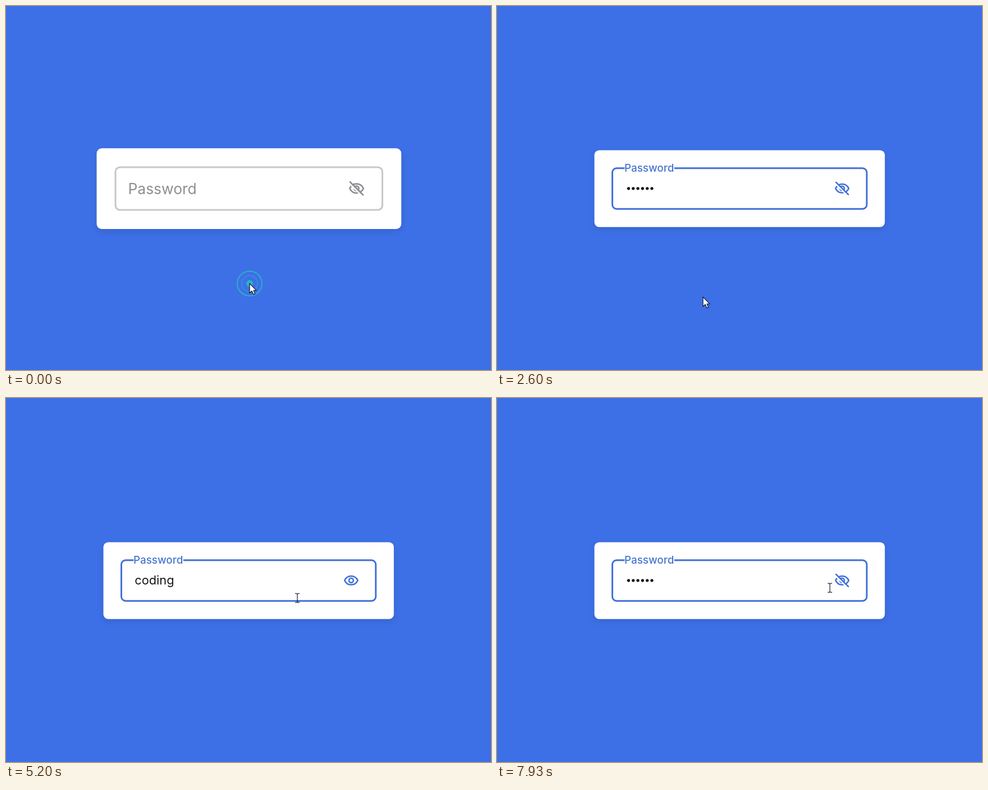
Write an HTML page with a canvas that moves like this. It is 864x648 px and loops after 8 s.

```html
<!DOCTYPE html>
<html lang="en">
<head>
<meta charset="utf-8">
<title>Password field</title>
<style>
html, body { margin: 0; width: 100%; height: 100%; overflow: hidden; background: #3d70e6; }
canvas { display: block; width: 864px; height: 648px; }
</style>
</head>
<body>
<canvas id="stage" width="864" height="648"></canvas>
<script>
const ctx = document.getElementById('stage').getContext('2d');
const LOOP = 8000;
const FONT = 'Inter, "Open Sans", sans-serif';
const GREY = [200, 200, 200], TEXT_GREY = [142, 143, 147], BLUE = [64, 112, 218];
const TEAL = '38, 198, 190';
const FOCUS_AT = 670;
const KEY_TIMES = [1400, 1530, 1670, 1800, 1930, 2070];
const CARET_ON = [[670, 1230], [1400, 2600], [3130, 3670]];
const SHOW_TEXT = [3920, 6680];

// time, x, y, 1 = straight speed towards this point
const PATH = [
  [0, 434, 494], [60, 434, 494], [470, 370.5, 350], [730, 370.5, 350],
  [1140, 342.5, 518], [1200, 342.5, 518], [1400, 367, 518], [2990, 367, 518],
  [3400, 605, 328], [3930, 605, 328], [4500, 259, 326], [5000, 400, 345, 1],
  [5200, 517, 356, 1], [5270, 657, 360, 1], [5330, 657.5, 338, 1],
  [5700, 273, 328], [6060, 606, 328], [6260, 606, 328], [6330, 611, 329],
  [6660, 611, 329], [7220, 256, 331], [7340, 256, 328], [7950, 594, 338], [8000, 594, 338]
];
const CLICKS = [[-230, 434, 494], [665, 368, 349], [3670, 605, 328], [6530, 612, 329]];

const clamp = v => Math.max(0, Math.min(1, v));
const lerp = (a, b, p) => a + (b - a) * p;
const smooth = p => { p = clamp(p); return p * p * (3 - 2 * p); };
const mix = (a, b, p) => `rgb(${a.map((v, i) => Math.round(lerp(v, b[i], p))).join(',')})`;
const within = (t, [from, to]) => t >= from && t < to;

function roundRect(x, y, w, h, r) {
  ctx.beginPath();
  ctx.roundRect(x, y, w, h, r);
}

function circle(x, y, r) {
  ctx.beginPath();
  ctx.arc(x, y, Math.max(0, r), 0, Math.PI * 2);
}

function line(x1, y1, x2, y2) {
  ctx.beginPath();
  ctx.moveTo(x1, y1);
  ctx.lineTo(x2, y2);
  ctx.stroke();
}

function focusProgress(t) {
  if (t < FOCUS_AT) return 0;
  const u = clamp((t - FOCUS_AT + 30) / 200);
  return 1 - Math.pow(1 - u, 2.2) * (1 + 0.85 * u);
}

function drawEye(color, crossed) {
  ctx.save();
  ctx.translate(624.5, 324.7);
  ctx.scale(1.36, 1.36);
  ctx.translate(-12, -12);
  ctx.strokeStyle = color;
  ctx.lineWidth = 2;
  ctx.stroke(new Path2D('M3 12C4.5 8.6 7.6 6 12 6S19.5 8.6 21 12C19.5 15.4 16.4 18 12 18S4.5 15.4 3 12Z'));
  circle(12, 12, 3);
  ctx.stroke();
  if (crossed) {
    ctx.strokeStyle = '#fff';
    ctx.lineWidth = 1.9;
    line(1, 3.7, 20, 22.7);
    ctx.strokeStyle = color;
    ctx.lineWidth = 2;
    line(3, 3, 21, 21);
  }
  ctx.restore();
}

function drawValue(t) {
  const typed = KEY_TIMES.filter(k => t >= k).length;
  ctx.fillStyle = '#151515';
  if (within(t, SHOW_TEXT)) {
    ctx.font = `400 22.8px ${FONT}`;
    ctx.fillText('coding', 220, 332);
  } else {
    for (let i = 0; i < typed; i++) {
      circle(225.3 + i * 8.72, 324.8, 2.8);
      ctx.fill();
    }
  }
  if (CARET_ON.some(span => within(t, span))) {
    ctx.fillRect(220.9 + typed * 8.75, 309.5, 1.5, 30);
  }
}

function drawLabel(p) {
  const size = lerp(26.4, 19.8, p), y = lerp(325, 286.2, p);
  ctx.font = `${p > 0 ? 500 : 400} ${size}px ${FONT}`;
  if (p > 0) {
    ctx.fillStyle = '#fff';
    ctx.fillRect(218, y - 10, ctx.measureText('Password').width, 20);
  }
  ctx.fillStyle = mix(TEXT_GREY, [72, 117, 207], p);
  ctx.fillText('Password', 217.5, y + size * 0.36);
}

function drawCard(t) {
  const p = focusProgress(t);
  const zoom = lerp(1, 0.9533, smooth((t - 700) / 450));
  ctx.save();
  ctx.translate(419, 325);
  ctx.scale(zoom, zoom);
  ctx.translate(-419, -325);

  ctx.save();
  ctx.shadowColor = 'rgba(0, 0, 0, .1)';
  ctx.shadowBlur = 12;
  ctx.shadowOffsetY = 5;
  ctx.fillStyle = '#fff';
  roundRect(161.5, 253.3, 542.7, 143.6, 9);
  ctx.fill();
  ctx.restore();

  ctx.strokeStyle = mix(GREY, BLUE, p);
  ctx.lineWidth = 3.1;
  roundRect(195, 287, 475.5, 76, 8);
  ctx.stroke();

  drawValue(t);
  drawLabel(p);
  drawEye(mix(TEXT_GREY, BLUE, p), !within(t, SHOW_TEXT));
  ctx.restore();
}

function strokeRing(x, y, r, width, alpha) {
  ctx.strokeStyle = `rgba(${TEAL}, ${alpha})`;
  ctx.lineWidth = width;
  circle(x, y, r);
  ctx.stroke();
}

function drawRipple(age, x, y) {
  if (age < 0 || age > 620) return;
  const outer = 8 + 20 * clamp(age / 330);
  const outerAlpha = age < 230 ? lerp(0.2, 0.85, clamp(age / 100)) : lerp(0.75, 0.12, clamp((age - 230) / 100));
  strokeRing(x, y, outer, 2, outerAlpha * (1 - clamp((age - 340) / 100)));

  if (age > 150) {
    const grow = clamp((age - 230) / 110);
    const fade = 1 - clamp((age - 350) / 200);
    strokeRing(x, y, Math.min(26, 14 + (age - 230) * 0.075), lerp(1.5, 6, grow), lerp(0.45, 0.75, grow) * fade);
  }

  const dot = age < 230 ? lerp(3.6, 6, clamp(age / 130)) : 6 * (1 - clamp((age - 230) / 90));
  ctx.fillStyle = `rgba(${TEAL}, .8)`;
  circle(x, y, dot);
  ctx.fill();
}

function pointerAt(t) {
  const i = Math.max(1, PATH.findIndex(k => k[0] > t));
  const a = PATH[i - 1], b = PATH[i];
  const u = (t - a[0]) / (b[0] - a[0]);
  const p = b[3] ? u : smooth(u);
  return [lerp(a[1], b[1], p), lerp(a[2], b[2], p)];
}

const ARROW = new Path2D('M0 0V17L4 13.3L6.8 19.6L9.6 18.4L6.9 12.3H12Z');
const HAND = new Path2D('M-1.5 1.5Q0 -.8 1.6 1.5V9Q3 7.4 4.8 9.2Q6.6 8 8 9.8Q10.6 9 11.6 11.6V17Q11.4 20 9.8 22V24.5H1V22.4Q-2.4 18.5 -5 14.8Q-5.8 11.8 -3.2 12.3L-1.5 14.2Z');

function drawPointer(t) {
  const [x, y] = pointerAt(t);
  const inField = x > 207 && x < 657 && y > 290 && y < 359;
  const overEye = inField && Math.hypot(x - 615, y - 325) < 18;
  ctx.save();
  ctx.translate(x, y);
  ctx.fillStyle = '#fff';
  ctx.strokeStyle = '#171b2b';
  ctx.lineWidth = 1.2;
  ctx.lineJoin = 'round';
  if (inField && !overEye) {
    line(0, -7.5, 0, 7.5);
    for (const side of [-1, 1]) {
      line(-4, side * 8, -1, side * 8);
      line(1, side * 8, 4, side * 8);
      line(-1, side * 8, 0, side * 7);
      line(1, side * 8, 0, side * 7);
    }
  } else {
    const shape = overEye ? HAND : ARROW;
    ctx.fill(shape);
    ctx.stroke(shape);
    if (overEye) {
      line(1.6, 9, 1.6, 13);
      line(4.8, 9.2, 4.8, 13);
      line(8, 9.8, 8, 13);
    }
  }
  ctx.restore();
}

function draw(t) {
  ctx.fillStyle = '#3d70e6';
  ctx.fillRect(0, 0, 864, 648);
  drawCard(t);
  for (const [at, x, y] of CLICKS) drawRipple(t - at, x, y);
  drawPointer(t);
}

const start = performance.now();
function tick() {
  draw((performance.now() - start) % LOOP);
  requestAnimationFrame(tick);
}
tick();
</script>
</body>
</html>
```
